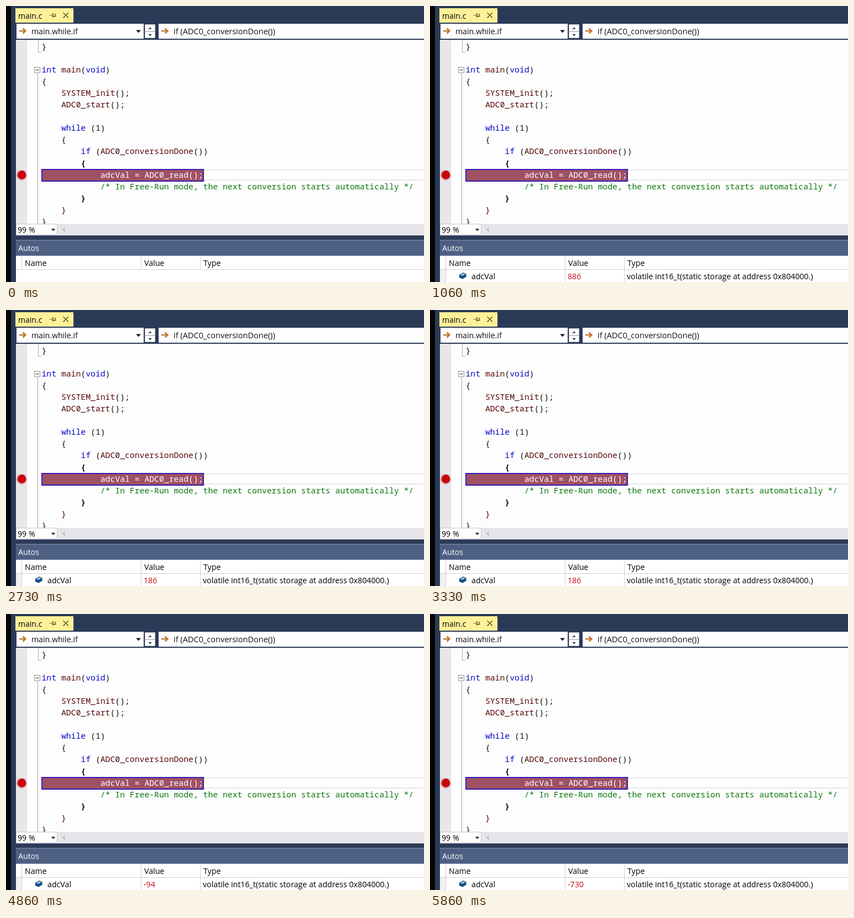
Recreate the animation shown at these times as an HTML page with a canvas. Size 756 px wide and 498 px high, loop 5.92 s.

```html
<!DOCTYPE html>
<html lang="en">
<head>
<meta charset="utf-8">
<title>Debugger watch</title>
<style>
  html, body { margin: 0; width: 100%; height: 100%; overflow: hidden; background: #fff; }
  canvas { display: block; }
</style>
</head>
<body>
<canvas id="stage" width="756" height="498"></canvas>
<script>
const ctx = document.getElementById('stage').getContext('2d', { alpha: false });
const LOOP = 5920;
const UI = '"Open Sans", "Noto Sans", sans-serif';
const MONO = '"Noto Sans Mono", "DejaVu Sans Mono", monospace';
const NAVY = '#2b3a57', MARGIN = '#e6e7e9', GRID = '#d0d0d4', EDGE = '#8593ad';
const KEYWORD = '#0808c8', NAME = '#560808', PLAIN = '#101010', COMMENT = '#0c780c';
const CHAR = 8.855, LINE = 21.05;

// [start time, value shown in the Autos row]
const readings = [[330, 886], [1530, 627], [2730, 186], [3800, -94], [5460, -730]];

// Each line: [row, column, [text, colour, weight]...]
const code = [
  [0, 0, ['}', PLAIN]],
  [2, 0, ['int', KEYWORD], [' main', NAME], ['(', PLAIN], ['void', KEYWORD], [')', PLAIN]],
  [3, 0, ['{', PLAIN]],
  [4, 4, ['SYSTEM_init', NAME], ['();', PLAIN]],
  [5, 4, ['ADC0_start', NAME], ['();', PLAIN]],
  [7, 4, ['while', KEYWORD], [' (1)', PLAIN]],
  [8, 4, ['{', PLAIN]],
  [9, 8, ['if', KEYWORD], [' (', PLAIN], ['ADC0_conversionDone', NAME], ['())', PLAIN]],
  [10, 8, ['{', PLAIN, 'bold']],
  [11, 12, ['adcVal = ADC0_read();', '#fff']],
  [12, 12, ['/* In Free-Run mode, the next conversion starts automatically */', COMMENT]],
  [13, 8, ['}', PLAIN, 'bold']],
  [14, 4, ['}', NAME]],
  [15, 0, ['}', PLAIN]],
];

function rect(x, y, w, h, color) {
  ctx.fillStyle = color;
  ctx.fillRect(x, y, w, h);
}

function frame(x, y, w, h, color) {
  ctx.lineWidth = 1;
  ctx.strokeStyle = color;
  ctx.strokeRect(x + .5, y + .5, w - 1, h - 1);
}

function label(text, x, y, color = '#000', size = 14.2) {
  ctx.font = `${size}px ${UI}`;
  ctx.fillStyle = color;
  ctx.fillText(text, x, y);
}

function shape(color, ...points) {
  ctx.fillStyle = color;
  ctx.beginPath();
  for (const [x, y] of points) ctx.lineTo(x, y);
  ctx.fill();
}

function stroke(path, color, width) {
  ctx.strokeStyle = color;
  ctx.lineWidth = width;
  ctx.stroke(new Path2D(path));
}

function disc(x, y, r, color) {
  ctx.fillStyle = color;
  ctx.beginPath();
  ctx.arc(x, y, r, 0, 7);
  ctx.fill();
}

function triangle(x, y, w, h, color = '#141414') {
  shape(color, [x - w, y - h / 2], [x + w, y - h / 2], [x, y + h / 2]);
}

function tabAndNavigation() {
  rect(0, 0, 756, 498, NAVY);
  rect(0, 0, 9, 498, '#050507');
  rect(17, 4, 105, 26, '#fff199');
  label('main.c', 22, 23, '#000', 14);
  stroke('M79 17H84M84.5 13V21M85 14.5H89.5V18.5H85', '#6d5c2c', 1.2);
  stroke('M85 18.5H90', '#6d5c2c', 2);
  stroke('M103.5 12L113 21.5M113 12L103.5 21.5', '#6d5c2c', 1.7);

  rect(19, 32, 230, 27, '#fff');
  rect(251, 33, 19, 25, '#fff');
  frame(251, 33, 19, 13, '#c2c6d0');
  frame(251, 46, 19, 12, '#c2c6d0');
  triangle(260.5, 40, 3, -3);
  triangle(260.5, 52.5, 3, 3);
  triangle(239.5, 46, 4.5, 5);
  rect(276, 32, 480, 27, '#fff');
  for (const x of [24, 281]) {
    stroke(`M${x} 45H${x + 11}M${x + 6.5} 40.5L${x + 11.5} 45L${x + 6.5} 49.5`, '#bd752c', 2.4);
  }
  label('main.while.if', 46, 51, '#101010', 14.1);
  label('if (ADC0_conversionDone())', 303, 51, '#101010', 14.5);
}

function editor() {
  rect(18, 61, 738, 332, '#fdfdfe');
  rect(18, 61, 20, 332, MARGIN);
  stroke('M58.5 61V83.5H63M57.5 122V393', '#a5a5a5', 1);
  frame(51, 110, 11, 11, '#999');
  stroke('M53.5 115.5H59.5', '#333', 1);

  rect(358, 295, 398, 2, '#e6e6ee');
  rect(358, 313, 398, 2, '#e6e6ee');
  rect(64, 294, 294, 23, '#3c1cb0');
  rect(66, 296, 290, 19, '#a05264');
  disc(28.5, 305, 9.6, '#b9787f');
  disc(28.5, 305, 8.9, '#f1e2e5');
  disc(28.5, 305, 7.9, '#c9040f');

  ctx.save();
  ctx.beginPath();
  ctx.rect(18, 61, 738, 332);
  ctx.clip();
  for (const [row, column, ...parts] of code) {
    let x = 64.5 + column * CHAR;
    for (const [text, color, weight = 500] of parts) {
      ctx.font = `${weight} ${CHAR / .6}px ${MONO}`;
      ctx.fillStyle = color;
      ctx.fillText(text, x, 78 + row * LINE);
      x += text.length * CHAR;
    }
  }
  ctx.restore();

  rect(18, 393, 738, 21, '#e6e6ea');
  rect(18, 393, 75, 20, '#fff');
  frame(18, 393, 75, 20, '#c2c6d0');
  label('99 %', 21, 409);
  triangle(85.5, 404, 3.5, 4);
  shape('#c4c5cc', [107, 399], [107, 408], [101, 403.5]);
}

function autos(time) {
  rect(18, 423, 738, 28, '#4d6083');
  rect(18, 422, 738, 1, EDGE);
  rect(18, 450, 738, 1, EDGE);
  label('Autos', 22, 442, '#fff');
  rect(18, 451, 738, 47, '#fff');
  rect(28, 451, 1, 24, GRID);
  rect(18, 475, 738, 1, GRID);
  for (const x of [244, 351]) rect(x, 451, 1, 24, GRID);
  label('Name', 34, 469);
  label('Value', 250, 469);
  label('Type', 357, 469);

  const current = readings.findLast(([start]) => time >= start);
  if (!current) return;
  rect(18, 476, 10, 22, '#f0f0f2');
  for (const x of [28, 244, 351]) rect(x, 476, 1, 22, GRID);
  shape('#124c86', [53, 485], [60, 481], [65.5, 483.5], [65.5, 488.5], [59, 492.5], [53, 490]);
  shape('#9cc5e6', [54.5, 485.2], [60, 482.2], [64, 484], [59, 487]);
  label('adcVal', 75, 493);
  label(current[1], 249, 493, '#c40c18');
  label('volatile int16_t(static storage at address 0x804000.)', 356, 493);
}

function draw() {
  tabAndNavigation();
  editor();
  autos(performance.now() % LOOP);
  requestAnimationFrame(draw);
}
draw();
</script>
</body>
</html>
```
